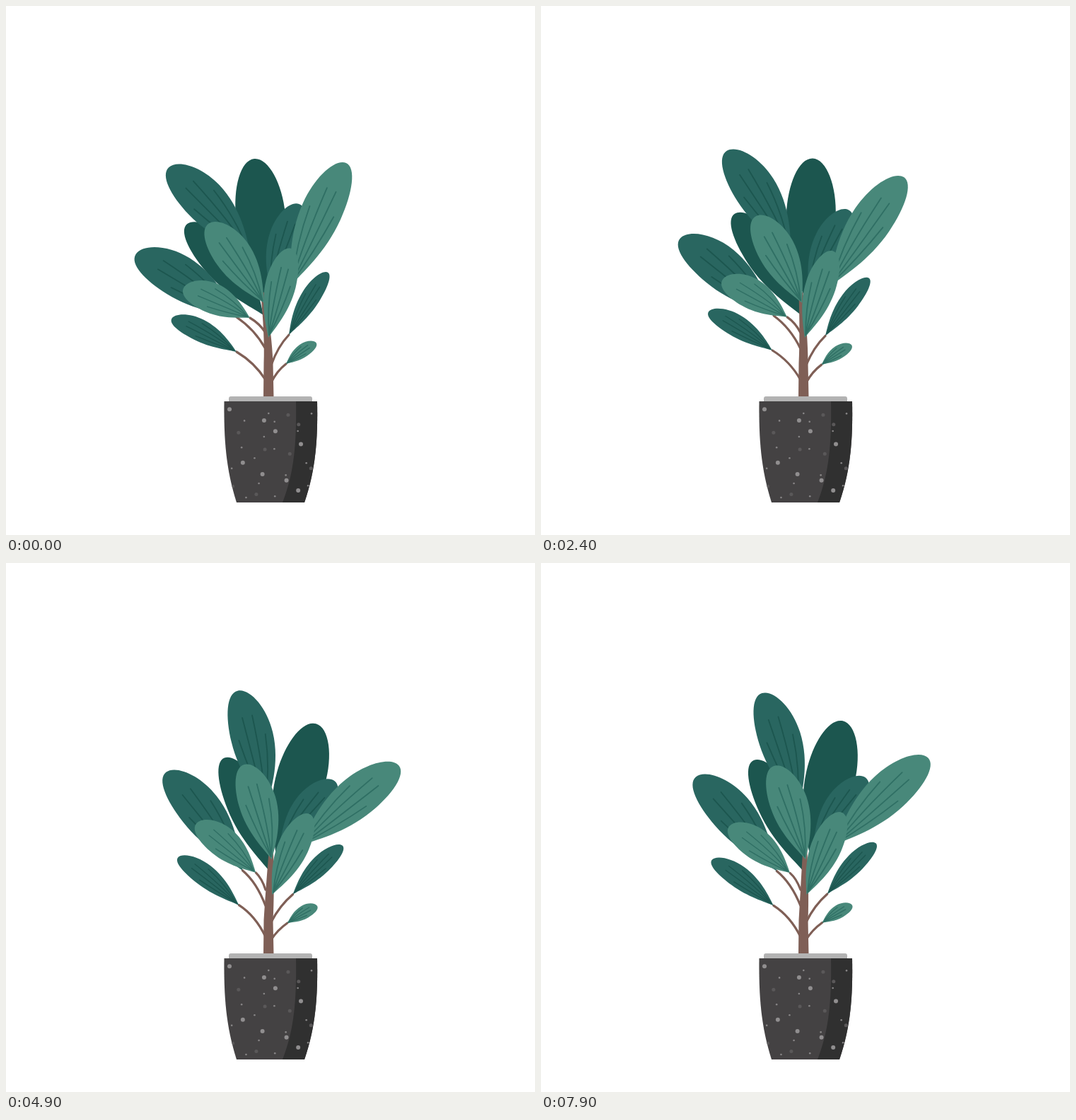
An HTML page with a canvas that plays this animation: 748 by 748 pixels, repeating every 8 s.

```html
<!DOCTYPE html>
<html lang="en">
<head>
<meta charset="utf-8">
<title>Swaying plant</title>
<style>
html, body { margin: 0; width: 100%; height: 100%; overflow: hidden; background: #fff; }
canvas { display: block; width: 748px; height: 748px; }
</style>
</head>
<body>
<canvas id="stage" width="748" height="748"></canvas>
<script>
const ctx = document.getElementById('stage').getContext('2d');
const LOOP = 8000, STEP = 100, HALF_SWAY = 6050;
const DARK = '#1c564f', MID = '#296660', LIGHT = '#48887a', WOOD = '#7f5f56';
const VEIN = { [MID]: '#1c564f', [LIGHT]: '#2f6f64' };
const TRUNK_X = 371, SOIL_Y = 545;
const rad = deg => deg * Math.PI / 180;

// Base point, tilt from upright, length and width at rest, then how far it turns
const leaf = (color, x, y, tilt, len, width, turn) =>
  ({ color, x, y, tilt: rad(tilt), len, width, turn: rad(turn) });

const rear = [
  leaf(DARK, 372, 420, -5.9, 205, 70, 24),
  leaf(DARK, 364, 437, -40, 168, 54, 20),
  leaf(MID, 346, 350, -43.6, 168, 60, 33),
  leaf(MID, 373, 400, 19, 127, 48, 23.5),
  leaf(LIGHT, 402, 396, 24.4, 191, 58, 29)
];
const stalked = [
  leaf(MID, 326, 440, -58, 168, 60, 22),
  leaf(LIGHT, 345, 441, -66, 103, 43, 17),
  leaf(MID, 326, 489, -63, 103, 31, 12),
  leaf(MID, 400, 465, 32, 104, 27, 15),
  leaf(LIGHT, 396, 506, 55, 52, 19, 6)
];
const front = [
  leaf(LIGHT, 365, 420, -35, 137, 53, 20.5),
  leaf(LIGHT, 371, 469, 14, 130, 43, 12)
];

// The trunk bends more with height; side branches pivot around it
const bend = y => 12 * Math.max(0, (SOIL_Y - y) / 125) ** 1.5;
const sway = (x, y, p) => [x + bend(y) * p, y + .13 * (x - TRUNK_X) * p];

function drawLeaf({ color, x, y, tilt, len, width, turn }, p) {
  const angle = tilt + turn * p;
  const l = len * (1 - .085 * p * Math.sin(angle));
  const h = width / 2;
  const arch = -.04 * len * Math.sin(tilt);
  ctx.save();
  ctx.translate(...sway(x, y, p));
  ctx.rotate(angle - Math.PI / 2);
  ctx.fillStyle = color;
  ctx.beginPath();
  ctx.moveTo(0, 0);
  ctx.bezierCurveTo(.12 * l, arch / 2 - .3 * h, .33 * l, arch - h, .6 * l, arch - h);
  ctx.bezierCurveTo(.82 * l, arch - h, l, -.55 * h, l, 0);
  ctx.bezierCurveTo(l, .55 * h, .82 * l, arch + h, .6 * l, arch + h);
  ctx.bezierCurveTo(.33 * l, arch + h, .12 * l, arch / 2 + .3 * h, 0, 0);
  ctx.fill();
  if (VEIN[color]) {
    ctx.strokeStyle = VEIN[color];
    ctx.lineWidth = l > 110 ? 1.8 : 1.4;
    ctx.lineCap = 'round';
    ctx.beginPath();
    for (const k of [-.64, -.24, .24, .64]) {
      ctx.moveTo(.03 * l, 0);
      ctx.quadraticCurveTo(.3 * l, .75 * k * h + arch, (.88 - .44 * Math.abs(k)) * l, k * h + arch);
    }
    ctx.stroke();
  }
  ctx.restore();
}

// A stalk leaves its leaf base and drops into the trunk; upright leaves join lower
function drawStalk({ x, y, tilt }, p) {
  const joint = TRUNK_X + Math.sign(x - TRUNK_X) * 4;
  const drop = Math.abs(x - TRUNK_X) * (.2 + 1.5 * Math.cos(tilt));
  const [sx, sy] = sway(x, y, p);
  ctx.beginPath();
  ctx.moveTo(sx, sy);
  ctx.quadraticCurveTo(sx + (joint - sx) * .62, sy + drop * .38, joint, y + drop);
  ctx.stroke();
}

function drawTrunk(p) {
  const top = 360 + 13 * p;
  ctx.fillStyle = WOOD;
  ctx.beginPath();
  ctx.moveTo(364, 554);
  ctx.lineTo(364.5, 505);
  ctx.quadraticCurveTo(366 + p, 465, top, 405);
  ctx.lineTo(top + 6, 405);
  ctx.quadraticCurveTo(376 + 4 * p, 465, 377.5, 505);
  ctx.lineTo(378.5, 554);
  ctx.fill();
}

function random(seed) {
  return () => (seed = seed * 16807 % 2147483647) / 2147483647;
}

// One speckle in each cell of a loose grid
function drawSpeckles() {
  const rnd = random(41);
  const kinds = [[3, '#908e8f'], [1.3, '#888687'], [2.5, '#5a5859'], [1.3, '#888687']];
  for (let i = 0; i < 32; i++) {
    const col = i % 4, row = Math.floor(i / 4);
    const [r, color] = kinds[(col + row * 3) % 4];
    ctx.fillStyle = color;
    ctx.beginPath();
    ctx.arc(316 + 31 * (col + .8 * rnd()), 565 + 17 * (row + .8 * rnd()), r, 0, 2 * Math.PI);
    ctx.fill();
  }
}

function drawPot() {
  ctx.fillStyle = '#b3b3b3';
  ctx.beginPath();
  ctx.roundRect(315, 552, 118, 10, 3);
  ctx.fill();

  ctx.save();
  ctx.beginPath();
  ctx.moveTo(308.5, 559);
  ctx.lineTo(440, 559);
  ctx.bezierCurveTo(441, 613, 438, 655, 422, 702);
  ctx.lineTo(326, 702);
  ctx.bezierCurveTo(311, 655, 308, 613, 308.5, 559);
  ctx.clip();
  ctx.fillStyle = '#444243';
  ctx.fillRect(300, 559, 150, 143);
  ctx.fillStyle = '#303030';
  ctx.beginPath();
  ctx.moveTo(410, 559);
  ctx.bezierCurveTo(411, 615, 408, 660, 391, 702);
  ctx.lineTo(450, 702);
  ctx.lineTo(450, 559);
  ctx.fill();
  drawSpeckles();
  ctx.restore();
}

function draw(time) {
  const t = Math.floor((time % LOOP) / STEP) * STEP;
  const p = (1 - Math.cos(Math.PI * t / HALF_SWAY)) / 2;
  ctx.fillStyle = '#fff';
  ctx.fillRect(0, 0, 748, 748);
  rear.forEach(l => drawLeaf(l, p));
  ctx.strokeStyle = WOOD;
  ctx.lineWidth = 3.2;
  ctx.lineCap = 'round';
  stalked.forEach(l => drawStalk(l, p));
  drawTrunk(p);
  [...stalked, ...front].forEach(l => drawLeaf(l, p));
  drawPot();
}

const start = performance.now();
function tick() {
  draw(performance.now() - start);
  requestAnimationFrame(tick);
}
tick();
</script>
</body>
</html>
```
